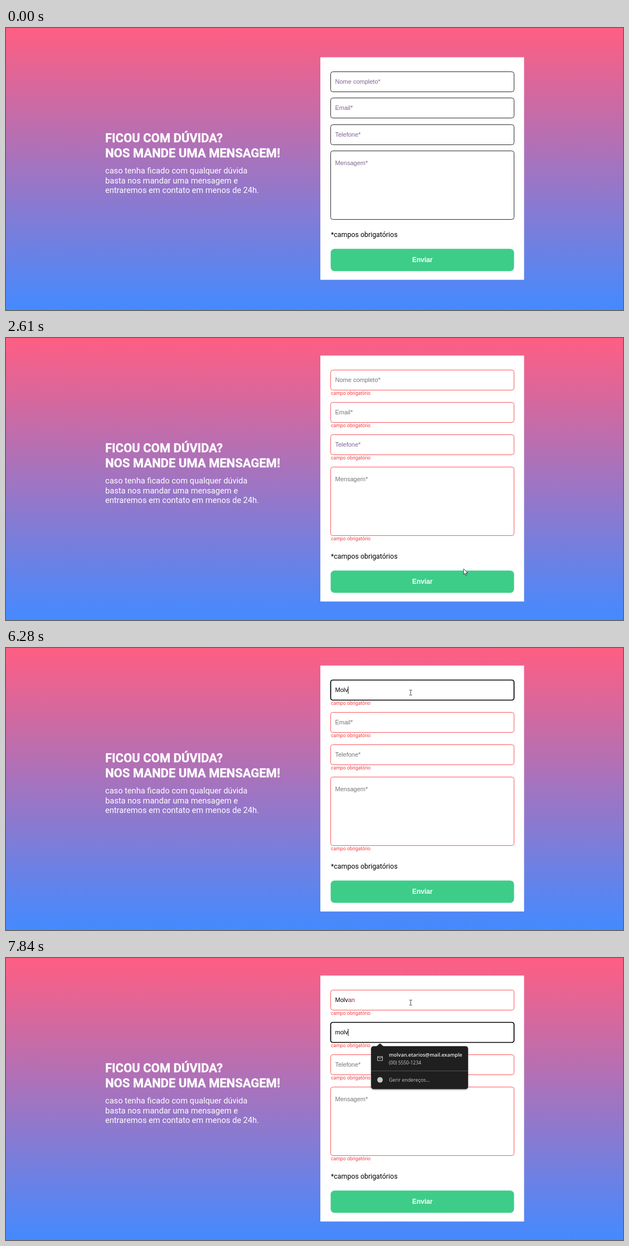
Write an HTML page that moves like this. It is 1107 by 506 pixels and loops after 8 s.

```html
<!DOCTYPE html>
<html lang="pt">
<head>
<meta charset="utf-8">
<title>Formulário de contato</title>
<style>
html, body { margin: 0; width: 100%; height: 100%; overflow: hidden; }
body { background: linear-gradient(#ff5e82, #448aff); }
svg { display: block; width: 100%; height: 100%; }
text { white-space: pre; }
.rob { font-family: Roboto, sans-serif; }
.ari { font-family: "Liberation Sans", Arial, sans-serif; }
.pop { font-family: "Open Sans", sans-serif; }
.menu { filter: drop-shadow(0 1px 1.5px #0006); }
</style>
</head>
<body>
<svg viewBox="0 0 1107 506">
  <g class="rob" fill="#fff">
    <g font-size="22" font-weight="700" stroke="#fff" stroke-width=".4">
      <text x="178" y="205">FICOU COM DÚVIDA?</text>
      <text x="178" y="231.5">NOS MANDE UMA MENSAGEM!</text>
    </g>
    <g font-size="14.62">
      <text x="178" y="261">caso tenha ficado com qualquer dúvida</text>
      <text x="178" y="278.7">basta nos mandar uma mensagem e</text>
      <text x="178" y="296.4">entraremos em contato em menos de 24h.</text>
    </g>
  </g>
  <g id="scene"></g>
</svg>
<script>
const LOOP = 8000, SUBMIT = 2560, FOCUS = 4960, TAB = 6610;
const LEFT = 582.5, WIDTH = 329;
const scene = document.getElementById('scene');
const pen = document.createElement('canvas').getContext('2d');
pen.font = '11px "Liberation Sans", Arial, sans-serif';

// Pointer strokes: smooth curves through evenly timed points
const strokes = [
  { from: 200, to: 1720, path: [[1024, 477], [800, 80], [556, 120], [590, 290], [825, 270], [740, 130], [739, 265]] },
  { from: 1720, to: 2190, path: [[739, 265], [821, 414]] },
  { from: 2950, to: 4060, path: [[821, 414], [704, 354], [697, 151], [736, 112], [815, 160], [789, 169]] },
  { from: 4060, to: 4750, path: [[789, 169], [757, 231], [630, 310], [885, 290], [726, 80]] }
];

function pointer(t) {
  const s = strokes.filter(s => s.from <= t).pop();
  if (!s) return null;
  const last = s.path.length - 1;
  const pos = Math.min(1, (t - s.from) / (s.to - s.from)) * last;
  const i = Math.min(last - 1, Math.floor(pos)), u = pos - i;
  const at = (n, c) => s.path[Math.max(0, Math.min(last, n))][c];
  const slope = (n, c) => (at(n + 1, c) - at(n - 1, c)) / 2;
  return [0, 1].map(c =>
    at(i, c) + (at(i + 1, c) - at(i, c)) * u * u * (3 - 2 * u) +
    slope(i, c) * u * (1 - u) ** 2 - slope(i + 1, c) * u * u * (1 - u));
}

const within = (t, a, b) => t >= a && t < b;
const typed = (word, from, step, t) => word.slice(0, Math.max(0, Math.floor((t - from) / step) + 1));
const text = (cls, x, y, size, fill, str, more = '') =>
  `<text class="${cls}" x="${x}" y="${y}" font-size="${size}" fill="${fill}" ${more}>${str}</text>`;
const rect = (x, y, w, h, r, style) =>
  `<rect x="${x}" y="${y}" width="${w}" height="${h}" rx="${r}" ${style}/>`;

function field(f, y, bad) {
  const stroke = f.focus ? '#000' : bad ? '#f9595c' : '#2b2b2b';
  let out = rect(LEFT, y, WIDTH, f.h, 4,
    `fill="#fff" stroke="${stroke}" stroke-width="${f.focus ? 1.7 : 1}"`);
  const base = y + (f.h > 50 ? 25 : 21.5);
  if (f.value) {
    const tail = `<tspan fill="${f.tail || '#000'}">${f.value.slice(4)}</tspan>`;
    out += text('ari', 590.5, base, 11, '#000', f.value.slice(0, 4) + tail);
  } else {
    out += text('ari', 590.5, base, 11, f.tint, f.label);
  }
  if (f.caret) {
    const x = 590.2 + pen.measureText(f.value).width;
    out += rect(x, base - 10, 1, 13, 0, 'fill="#111"');
  }
  if (bad) out += text('rob', 583, y + f.h + 8.8, 8.68, '#f73a3d', 'campo obrigatório');
  return out;
}

function menu(y, w, h, body) {
  const rule = y + h - 33;
  return `<g class="menu" fill="#1f1f1f"><path d="M664 ${y + 1}l7-6 7 6z"/>` +
    rect(655, y, w, h, 4.5, '') + '</g>' +
    rect(655, rule, w, 0.8, 0, 'fill="#606060"') + body +
    `<circle cx="671" cy="${rule + 16.5}" r="5" fill="#c4c7c5"/>` +
    text('pop', 687, rule + 20, 8.9, '#c4c7c5', 'Gerir endereços…');
}

const person = y => `<g transform="translate(671 ${y})" fill="none" stroke="#c8c8c8">
  <circle r="4.5"/><circle cy="-1.2" r="1.5"/><path d="M-3 3.2q3-2.6 6 0"/></g>`;
const strong = (y, s) => text('pop', 687, y, 9, '#eee', s, 'font-weight="600"');
const soft = (y, s) => text('pop', 687, y, 8.4, '#d0d0d0', s);
const MAIL = 'molvan.etarios@mail.example';

const nameMenu = menu(100.3, 172, 104, person(122.3) +
  strong(118.5, 'MOLVAN DOS TARIOS BEMAS') + soft(133, MAIL) +
  person(155) + strong(158.4, 'Molvan Tarios Bemas'));
const mailMenu = menu(158.3, 174, 77,
  '<path d="M666.5 177h9v7h-9zl4.5 3.5 4.5-3.5" fill="none" stroke="#c8c8c8"/>' +
  strong(176.5, MAIL) + soft(191.2, '(00) 5550-1234'));

const shapes = {
  arrow: '<path d="M0 0V10.3L2.4 8.2 4 12 5.7 11.3 4.1 7.6H7.3Z" fill="#fff" stroke="#222" stroke-width=".8"/>',
  beam: '<path d="M-2.5-4.5H-.6L0-4 .6-4.5H2.5M0-4V4M-2.5 4.5H-.6L0 4 .6 4.5H2.5" fill="none" stroke="#333" stroke-width=".9"/>',
  hand: '<path d="M-1 7V1a1 1 0 0 1 2 0V4.5l5 .9q1.3.3 1.1 1.5l-.8 5H0L-3.5 8q0-1.6 2.5-1z" fill="#fff" stroke="#222" stroke-width=".8"/>'
};

function draw(t) {
  const bad = t >= SUBMIT, shift = bad ? 21 : 0, gap = bad ? 58 : 47.5;
  const top = i => Math.ceil(173.5 + (i - 2) * gap) - 0.5;
  const grey = '#757575', mauve = '#7d6590', tint = bad ? grey : mauve;
  const fields = [
    { label: 'Nome completo*', h: 36, tint, value: typed('Molvan', 5890, 104, t), tail: '#8c2f2f',
      focus: within(t, FOCUS, TAB), caret: within(t, FOCUS, 5620) || within(t, 5890, TAB) },
    { label: 'Email*', h: 36, tint, value: typed('molv', 7480, 120, t),
      focus: t >= TAB, caret: within(t, TAB, 7150) || t >= 7480 },
    { label: 'Telefone*', h: 36, tint: t < 6270 ? mauve : grey },
    { label: 'Mensagem*', h: 123, tint }
  ];

  let out = rect(564, 52.5 - shift, 365.5, 399.3 + 2 * shift, 0, 'fill="#fff"');
  out += fields.map((f, i) => field(f, top(i), bad)).join('');
  out += text('rob', 583, 375 + shift, 12.4, '#000', '*campos obrigatórios');
  out += rect(LEFT, 396.3 + shift, WIDTH, 40, 7, 'fill="#3dcd89"');
  out += text('ari', 747, 420 + shift, 12, '#fff', 'Enviar', 'font-weight="700" text-anchor="middle"');
  if (within(t, 5030, 6270)) out += nameMenu;
  if (t >= 7480) out += mailMenu;

  const p = pointer(t);
  if (p) {
    const [x, y] = p;
    const inside = (y0, h) => x > LEFT && x < LEFT + WIDTH && y > y0 && y < y0 + h;
    const kind = fields.some((f, i) => inside(top(i), f.h)) ? 'beam' :
      inside(396 + shift, 40) ? 'hand' : 'arrow';
    if (within(t, 2500, 2610) || within(t, FOCUS, 5160))
      out += `<circle cx="${x - 0.7}" cy="${y - 0.7}" r="9" fill="#fdf35c"/>`;
    out += `<g transform="translate(${x} ${y})">${shapes[kind]}</g>`;
  }
  scene.innerHTML = out;
}

const start = performance.now();
function tick() {
  draw((performance.now() - start) % LOOP);
  requestAnimationFrame(tick);
}
tick();
</script>
</body>
</html>
```
